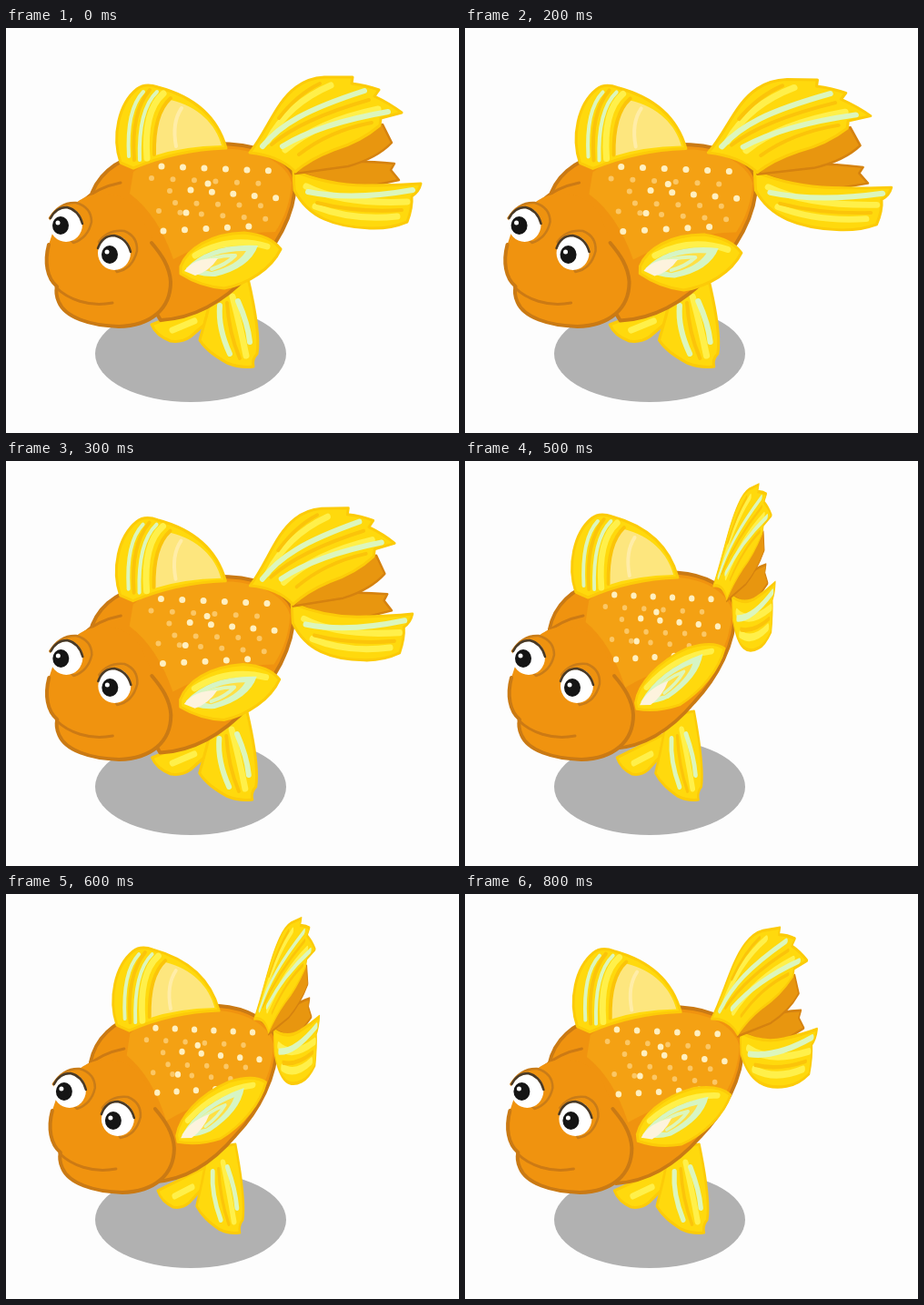
An HTML page that plays this animation: 498 by 445 pixels, repeating every 900 ms.

```html
<!DOCTYPE html>
<html lang="en">
<head>
<meta charset="utf-8">
<title>Goldfish</title>
<style>
  html, body { margin: 0; width: 100%; height: 100%; overflow: hidden; background: #fdfdfd; }
  svg { display: block; width: 100vw; height: 100vh; animation: swim 900ms step-end infinite; }

  /* --fold: 0 is the drawn pose, 1 the fully folded tail; every part follows it. */
  @keyframes swim {
    0% { --fold: 0; }
    11.11% { --fold: -.08; }
    22.22% { --fold: -.11; }
    33.33% { --fold: .08; }
    44.44% { --fold: .33; }
    55.55% { --fold: 1; }
    66.66% { --fold: .97; }
    77.77% { --fold: .87; }
    88.88% { --fold: .6; }
  }

  /* --a to --d: change of the part's matrix at full fold; --x, --y: its shift. */
  .part {
    --a: 0; --b: 0; --c: 0; --d: 0; --x: 0; --y: 0;
    transform: matrix(
      calc(1 + var(--fold) * var(--a)), calc(var(--fold) * var(--b)),
      calc(var(--fold) * var(--c)), calc(1 + var(--fold) * var(--d)),
      calc(var(--fold) * var(--x)), calc(var(--fold) * var(--y)));
  }
  #upper { --a: -.65; --b: -.17; --c: -.126; --d: .107; --x: 5; transform-origin: 268px 137px; }
  #lower { --a: -.663; --b: -.231; --c: .017; --d: .2; --x: -23; --y: -8; transform-origin: 317px 158px; }
  #pectoral { --a: -.081; --b: -.387; --c: .185; --d: -.116; --x: -4; --y: 3; transform-origin: 192px 265px; }
  #body { --a: -.095; --y: -5; transform-origin: 100px 0; }
  #dorsal { --a: -.033; --x: -4; --y: -4; transform-origin: 120px 0; }
  #pelvic { --a: -.2; transform-origin: 195px 0; }
  #head { --x: 4; }

  path { fill: none; stroke-linecap: round; stroke-linejoin: round; }
  .gold { fill: #ffd90d; stroke: #fccb08; stroke-width: 3; }
  .shade { fill: #e8960f; stroke: #d5820f; stroke-width: 2.5; }
  .skin { fill: #f0930f; }
  .line { stroke: #cc7a14; stroke-width: 3; }
  .rim { stroke: #ca7a14; stroke-width: 4; }
  .lid { fill: #ee920f; stroke: #c97c18; stroke-width: 2.5; }
  .lash { stroke: #4a3a26; stroke-width: 2.5; }
  .mint { stroke: #dcf6bd; stroke-width: 6; }
  .thin { stroke-width: 4; }
  .lemon { stroke: #fff04a; stroke-width: 7; }
  .amber { stroke: #fbc40a; stroke-width: 4; }
  .pale, .faint { stroke-dasharray: 0 23.5; }
  .pale { stroke: #fff0c0; stroke-width: 7; }
  .faint { stroke: #fbc765; stroke-width: 6; }
</style>
</head>
<body>
<svg viewBox="0 0 498 445" preserveAspectRatio="none">
  <ellipse cx="203" cy="358" rx="105" ry="53" fill="#b1b1b1"/>

  <g id="pelvic" class="part">
    <path class="gold" d="M160 326Q165 338 181 344Q193 346 203 339L218 326L225 300Z"/>
    <path class="lemon" d="M183 332L207 322"/>
    <path class="gold" d="M228 280C222 318 216 330 213 343C220 354 231 361 243 368Q258 374 272 372Q270 364 276 358Q280 335 266 275Z"/>
    <path class="lemon" d="M249 295Q258 330 264 360"/>
    <path class="mint" d="M235 305Q233 330 246 358M255 300Q266 325 268 345"/>
    <path class="amber" d="M243 302Q245 335 257 363"/>
  </g>

  <g id="body" class="part">
    <path class="skin rim" d="M92 190C98 163 120 145 150 138C190 128 230 125 260 129C292 134 315 150 318 168C318 206 296 243 268 270C240 300 207 319 170 321Z"/>
    <path style="fill:#f4a113" d="M140 158C165 137 215 132 250 133C285 136 309 151 314 170Q312 200 296 224Q240 224 184 254Q167 205 136 182Z"/>
    <path class="faint" d="M160 165L300 172M180 179V180M168 201L290 210M186 192L300 196"/>
    <path class="pale" d="M171 152L292 157M203 178L300 187M198 203V204M173 223L268 218M222 171V172"/>
  </g>

  <g id="lower" class="part">
    <path class="shade" d="M317 157Q355 142 427 149L423 156L432 167L380 178Z"/>
    <path class="gold" d="M316 157Q355 173 395 173Q430 173 456 171Q454 180 446 185Q447 197 441 213Q422 221 400 220Q370 219 350 210Q328 200 317 178Z"/>
    <path class="lemon" d="M330 174Q370 194 441 191M340 196Q380 212 430 207"/>
    <path class="mint" d="M332 180Q380 190 447 178"/>
    <path class="amber" d="M342 192Q385 203 435 200"/>
  </g>
  <g id="upper" class="part">
    <path class="shade" d="M318 160Q350 120 414 106L424 126Q408 143 376 152Z"/>
    <path class="gold" d="M268 137C288 112 296 82 319 65Q332 55 350 54L381 54L380 61Q396 63 410 68L405 75Q422 83 435 93L412 99L411 107Q390 125 360 134Q334 144 318 158Q300 140 268 137Z"/>
    <path class="lemon" d="M288 124Q310 83 357 63M307 134Q342 103 409 89"/>
    <path class="mint" d="M282 130C302 106 329 90 394 69M304 130Q345 105 420 92"/>
    <path class="amber" d="M292 128Q325 100 399 79M322 139Q355 113 402 104M300 99Q320 73 345 61"/>
  </g>

  <g id="dorsal" class="part">
    <path class="gold" d="M126 148C116 119 124 83 144 67Q153 60 167 65C205 75 232 96 242 132Q187 134 140 154Z"/>
    <path style="fill:#fde67e" d="M164 140Q162 95 181 79C211 86 231 106 237 129Q195 130 164 140Z"/>
    <path class="lemon" d="M155 143Q151 91 173 72"/>
    <path class="mint thin" d="M135 141Q132 90 151 70M147 145Q145 90 166 70"/>
    <path class="amber" d="M141 145Q137 93 158 68M163 139Q162 94 181 77"/>
    <path stroke="#ffeda8" stroke-width="4" d="M187 130Q182 104 193 88"/>
  </g>

  <g id="pectoral" class="part">
    <path class="gold" d="M192 262C199 243 224 226 262 225Q291 228 302 243C292 264 267 281 240 286Q214 284 192 270Z"/>
    <path class="lemon" d="M208 250Q245 228 287 240"/>
    <path style="fill:#d6f5c4" d="M198 264Q224 236 277 239Q268 264 230 273Q210 274 198 264Z"/>
    <path style="fill:#ffe045" d="M205 263Q230 244 264 245Q254 261 226 268Z"/>
    <path class="mint thin" d="M212 259Q232 249 252 250Q242 260 226 265"/>
    <path style="fill:#fdf3dd" d="M196 267Q207 252 233 253Q223 268 208 272Z"/>
  </g>

  <g id="head" class="part">
    <path class="line" d="M84 190Q101 175 126 170"/>
    <path class="skin" d="M68 201C90 172 136 177 150 208C157 232 179 250 181 279C181 309 159 327 124 328C92 327 65 318 58 301Q54 292 56 284C45 275 42 257 47 238Q53 215 68 201Z"/>
    <path class="rim" d="M160 236C171 249 180 262 181 279C181 309 159 327 124 328C92 327 65 318 58 301Q54 292 56 284C45 275 42 257 47 238"/>
    <path class="line" d="M55 285C68 298 91 307 117 302"/>
    <path class="lid" d="M48 209Q59 191 77 192Q94 197 94 213Q90 231 74 236Z"/>
    <ellipse cx="66" cy="216" rx="18" ry="19" fill="#fff"/>
    <path class="lash" d="M49 209Q55 197 67 197Q80 200 84 215"/>
    <path class="lid" d="M102 235Q112 221 130 223Q145 229 144 245Q139 265 122 268Z"/>
    <ellipse cx="119" cy="247" rx="18" ry="19" fill="#fff"/>
    <path class="lash" d="M101 242Q106 228 119 228Q133 231 137 246"/>
    <g fill="#151515">
      <ellipse cx="60" cy="217" rx="9" ry="10"/>
      <ellipse cx="114" cy="249" rx="9" ry="10"/>
    </g>
    <g fill="#fff">
      <circle cx="57" cy="214" r="2.5"/>
      <circle cx="111" cy="246" r="2.5"/>
    </g>
  </g>
</svg>
</body>
</html>
```
